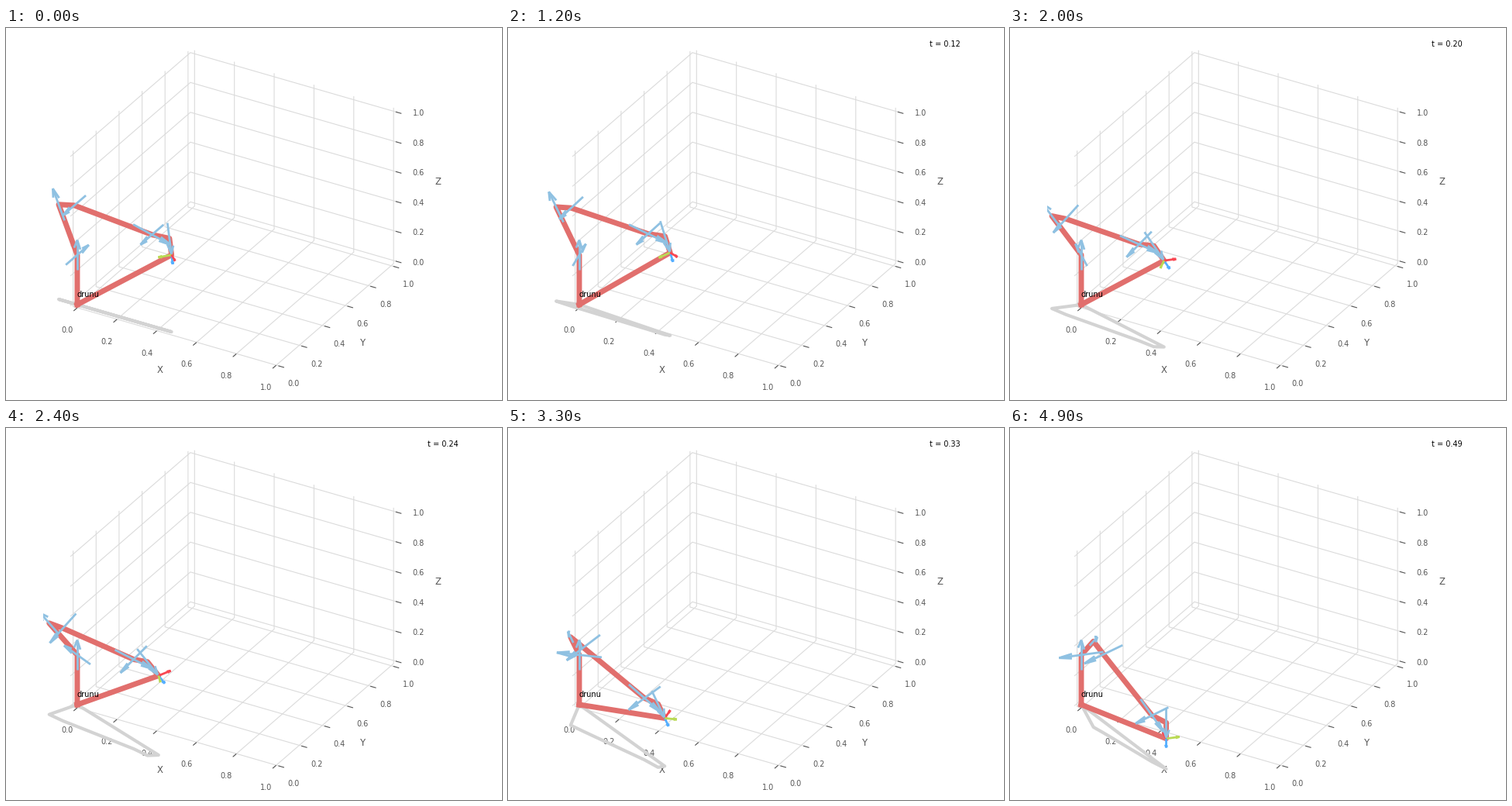
Write a matplotlib script that moves like this. It is 640 by 480 pixels and loops after 5 s.

```python
import numpy as np
import matplotlib.pyplot as plt
from matplotlib.animation import FuncAnimation
from matplotlib.collections import LineCollection

WIDTH, HEIGHT, FRAMES = 640, 480, 50
plt.rcParams.update({"font.family": "DejaVu Sans", "font.size": 7})

# Orthographic view: elevation 30, azimuth -60, box aspect 4:4:3
SCALE = 480 / 0.185 / 10 * 4 * 1.8294640721620434 / np.sqrt(41)
ORIGIN = np.array([48 + 480 * 0.095 / 0.185, 480 * 0.09 / 0.185])
C30 = np.sqrt(3) / 2
VIEW = SCALE * np.array([[C30, 0.5, 0], [0.25, -C30 / 2, -0.75 * C30]])
EYE = np.array([C30 / 2, -0.75, 0.375])

# Link geometry as (a, d, alpha); the last row is the flange
LINKS = [(0, 0.333, 0), (0, 0, -90), (0, 0.316, 90), (0.0825, 0, 90),
         (-0.0825, 0.384, -90), (0, 0, 90), (0.088, 0, 90), (0, 0.107, 0)]
START = np.array([0, -0.3, 0, -2.2, 0, 2, np.pi / 4])
GOAL = np.array([2.3589, -0.6977, -2.7815, -1.7145, -0.3248, 2.3529, -2.6250])
TOOL_COLORS = ["#F84752", "#BADA55", "#54AEFF"]


def project(points):
    return (np.asarray(points, float) - 0.5) @ VIEW.T + ORIGIN


def link_transform(a, d, alpha, q):
    ca, sa = np.cos(np.radians(alpha)), np.sin(np.radians(alpha))
    c, s = np.cos(q), np.sin(q)
    return np.array([[c, -s, 0, a],
                     [s * ca, c * ca, -sa, -d * sa],
                     [s * sa, c * sa, ca, d * ca],
                     [0, 0, 0, 1]])


def arm_frames(q):
    frames, pose = [], np.eye(4)
    for link, angle in zip(LINKS, [*q, 0]):
        pose = pose @ link_transform(*link, angle)
        frames.append(pose)
    return frames


def arrow_segments(tail, vec):
    """Shaft plus two barbs turned 15 degrees about a horizontal axis."""
    norm = np.hypot(vec[0], vec[1])
    axis = np.array([vec[1], -vec[0], 0]) / norm if norm > 1e-9 else np.array([0, 1, 0])
    tip = tail + vec
    segments = [(tail, tip)]
    for turn in np.radians([15, -15]):
        barb = (vec * np.cos(turn) + np.cross(axis, vec) * np.sin(turn)
                + axis * (axis @ vec) * (1 - np.cos(turn)))
        segments.append((tip - 0.3 * barb, tip))
    return np.array(segments)


fig = plt.figure(figsize=(WIDTH / 100, HEIGHT / 100), dpi=100, facecolor="white")
ax = fig.add_axes([48 / WIDTH, 0, 480 / WIDTH, 1])
ax.set(xlim=(48, 528), ylim=(HEIGHT, 0))
ax.axis("off")


def draw_line(points, color, width, zorder):
    return ax.plot(*project(points).T, color=color, lw=width, zorder=zorder)[0]


def draw_axes():
    low, high = -1 / 48, 1 + 1 / 48
    back = np.array([low, high, low])
    label_step = 11.5 * 48 / 691.2 / 12
    title_step = 22 * 48 / 691.2 / 12
    # axis index, name, edge the ticks sit on, outward direction, tick direction
    specs = [(0, "X", (0, low, low), (0, -1, -1), 1),
             (1, "Y", (high, 0, low), (1, 0, -1), 0),
             (2, "Z", (high, high, 0), (1, 1, 0), 0)]
    for i, name, edge, outward, tick_dir in specs:
        edge, outward = np.array(edge, float), np.array(outward)
        j, k = [n for n in range(3) if n != i]
        for value in np.linspace(0, 1, 6):
            corner = back.copy()
            corner[i] = value
            first, last = corner.copy(), corner.copy()
            first[j] = low + high - back[j]
            last[k] = low + high - back[k]
            draw_line([first, corner, last], "#dbdbdb", 0.8, 0.5)

            spot = edge.copy()
            spot[i] = value
            step = np.eye(3)[tick_dir] / 12
            draw_line([spot - 0.1 * step, spot + 0.2 * step], "#555555", 0.8, 1)
            ax.text(*project(spot + label_step * outward), f"{value:.1f}",
                    color="#555555", ha="center", va="top", zorder=1)
        middle = edge.copy()
        middle[i] = 0.5
        ax.text(*project(middle + title_step * outward), name, size=8.4,
                color="#555555", ha="center", va="center", zorder=1)


def make_arrow(color):
    arrow = LineCollection([], colors=color, linewidths=2)
    return ax.add_collection(arrow, autolim=False)


def place_arrow(arrow, tail, vec):
    segments = arrow_segments(tail, vec)
    arrow.set_segments(project(segments))
    arrow.set_zorder(6 + (segments @ EYE).max())


draw_axes()
shadow = draw_line(np.zeros((1, 3)), "lightgrey", 3, 2)
arm = draw_line(np.zeros((1, 3)), "#E16F6D", 5, 2.1)
ax.text(*project([0, 0, 0.05]), "drunu", color="black", zorder=3)
clock = fig.text(0.85, 0.95, "", color="black")
joint_arrows = [make_arrow("#8FC1E2") for _ in START]
tool_arrows = [make_arrow(color) for color in TOOL_COLORS]


def update(frame):
    u = frame / (FRAMES - 1)
    blend = u ** 3 * (10 - 15 * u + 6 * u * u)
    frames = arm_frames(START + (GOAL - START) * blend)

    base = np.zeros(3)
    points = np.array([base, *(f[:3, 3] for f in frames), base])
    arm.set_data(*project(points).T)
    shadow.set_data(*project(points * [1, 1, 0]).T)

    for arrow, pose in zip(joint_arrows, frames):
        vec = 0.2 * pose[:3, 2]
        place_arrow(arrow, pose[:3, 3] - vec / 2, vec)
    flange = frames[-1]
    for i, arrow in enumerate(tool_arrows):
        place_arrow(arrow, flange[:3, 3], 0.06 * flange[:3, i])

    clock.set_text(f"t = {frame / 100:.2f}" if frame else "")
    return []


anim = FuncAnimation(fig, update, frames=FRAMES, interval=100,
                     init_func=lambda: [], repeat=True, repeat_delay=0)
plt.show()
```
